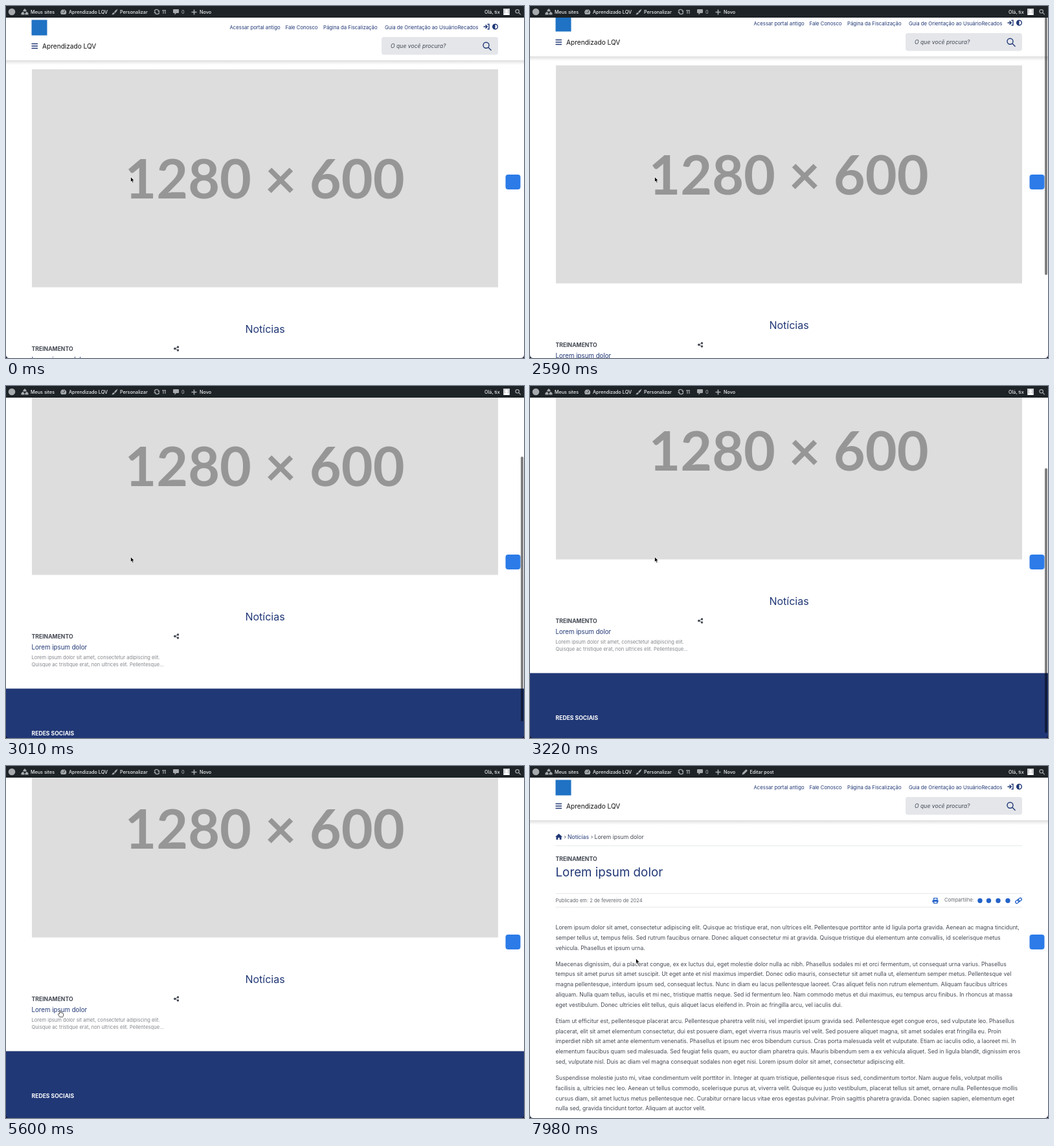
An HTML page for the animation above (8000 ms loop, 800 by 545 pixels).

```html
<!DOCTYPE html>
<html lang="pt-BR">
<head>
<meta charset="utf-8">
<style>
html, body { margin: 0; width: 100%; height: 100%; overflow: hidden; background: #fff }
svg { display: block; font: 8.64px Inter, sans-serif; fill: #434852 }
text { white-space: pre }
.bar { font-size: 7.2px; font-weight: 500; fill: #f0f0f1 }
.icon { fill: #a7aaad }
.line { fill: none; stroke: #a7aaad; stroke-width: 1.2 }
.navy { fill: #213876 }
.navyLine { fill: none; stroke: #213876; stroke-width: 1.4 }
.nav { font-size: 7.75px }
.site { font-size: 10.1px; fill: #111 }
.bold { font-weight: 700 }
.heading { font-size: 16px; text-anchor: middle }
.title { font-size: 18.8px }
.link { font-size: 9.72px }
.small { font-size: 7.6px; fill: #85888d }
.meta { font-size: 7.55px; fill: #63676d }
.rule { stroke: #e6e8ea }
.blue { fill: #2563c9 }
</style>
</head>
<body>
<svg id="stage" width="800" height="545" viewBox="0 0 800 545"></svg>
<script>
const text = (x, y, words, cls = '') => `<text x="${x}" y="${y}" class="${cls}">${words}</text>`;
const rect = (x, y, w, h, fill, r = 0) =>
  `<rect x="${x}" y="${y}" width="${w}" height="${h}" rx="${r}" fill="${fill}"/>`;
const path = (d, cls, extra = '') => `<path d="${d}" class="${cls}" ${extra}/>`;
const dot = (x, y, r, cls) => `<circle cx="${x}" cy="${y}" r="${r}" class="${cls}"/>`;

const siteName = 'Aprendizado LQV';

const adminBar = rect(0, 0, 800, 18, '#1d2327') +
  dot(9, 9, 5.3, 'icon') +
  path('M26.5 8.5V6.5L29 4l2.5 2.5v2zM23.5 13.5v-2.5l2.5-2.2 2.5 2.2v2.5zM29.5 13.5v-2.5l2.5-2.2 2.5 2.2v2.5z', 'icon') +
  text(38, 12, 'Meus sites') +
  path('M85.5 13A4.6 4.6 0 1 1 92 13z', 'icon') +
  path('M88.7 11l2.2-4M86 9.5h1M88.7 5.5v1', '', 'stroke="#1d2327" stroke-width=".9"') +
  text(97, 12, siteName) +
  path('M172.5 4.5q-4 2-5.5 5l1.5 1.5q3-2 4-6.5zM166.5 10q-2 0-3 3.5 3.5 0 4.5-2z', 'icon') +
  text(176, 12, 'Personalizar') +
  path('M229.2 8a3.6 3.6 0 0 1 6.8-.5M236.8 10a3.6 3.6 0 0 1-6.8.5', 'line') +
  path('M234 7.5h4l-2 2.5zM228 10.5h4l-2-2.5z', 'icon') +
  text(241, 12, '11') +
  path('M259 5h7q1 0 1 1v4q0 1-1 1h-3l-2.5 2.7V11H259q-1 0-1-1V6q0-1 1-1z', 'icon') +
  text(271, 12, '0', 'icon') +
  path('M290.5 5.5v8M286.5 9.5h8', 'line', 'style="stroke-width:1.6"') +
  text(299, 12, 'Novo') +
  `<g id="edit">${path('M327.5 13.5l.8-3 5.5-5.5 2.2 2.2-5.5 5.5z', 'icon')}${text(339.5, 12, 'Editar post')}</g>` +
  text(739, 12, 'Olá, tix') +
  rect(768, 4, 10, 10, '#cfd1d4') +
  path('M769 14q0-3.5 4-3.5t4 3.5zM773 5.5a2.2 2.4 0 1 1-.01 0z', '', 'fill="#fff"') +
  dot(789.7, 8.3, 2.7, 'line') + path('M791.8 10.3l3 3', 'line');

const header = rect(0, 84, 800, 7, 'url(#shade)') + rect(0, 18, 800, 66, '#fff') +
  rect(39.5, 21.5, 24, 24, '#1f72c4') +
  [[345.5, 'Acessar portal antigo'], [431.5, 'Fale Conosco'], [490, 'Página da Fiscalização'],
   [585, 'Guia de Orientação ao Usuário'], [697.5, 'Recados']]
    .map(([x, label]) => text(x, 35.6, label, 'navy nav')).join('') +
  path('M737.5 32h5M740.5 29.3l2.8 2.7-2.8 2.7M743.5 28.2h2.5v7.6h-2.5', 'navyLine') +
  dot(755.5, 32, 3.8, 'navyLine') + path('M755.5 28a4 4 0 0 0 0 8z', 'navy') +
  path('M39.5 58.5h9.5M39.5 62h9.5M39.5 65.5h9.5', 'navyLine') +
  text(56, 65.5, siteName, 'site') +
  rect(580, 48, 180, 27.5, '#e4e6ea', 4) +
  `<g font-style="italic">${text(594, 65, 'O que você procura?')}</g>` +
  `<g style="stroke-width:1.8">${dot(741.5, 60.8, 4.5, 'navyLine')}${path('M745 64.3l4.5 4.5', 'navyLine')}</g>`;

const home = header +
  rect(40, 98, 720, 337.5, '#ddd') +
  '<text x="399.5" y="297.5" fill="#969696" text-anchor="middle" style="font:700 84.3px Lato,sans-serif">1280 × 600</text>' +
  text(400, 506, 'Notícias', 'navy heading') +
  text(39.5, 533.5, 'TREINAMENTO', 'bold') +
  path('M265.5 528l-5 2.5 5 2.5', '', 'fill="none" stroke="#5c6066"') +
  dot(260.7, 530.5, 1.7) + dot(265.5, 528, 1.7) + dot(265.5, 533, 1.7) +
  text(39.5, 550.5, 'Lorem ipsum dolor', 'navy link') +
  text(39.5, 565.8, 'Lorem ipsum dolor sit amet, consectetur adipiscing elit.', 'small') +
  text(39.5, 577.2, 'Quisque ac tristique erat, non ultrices elit. Pellentesque…', 'small') +
  rect(0, 611.5, 800, 130, '#213876') +
  '<g fill="#fff">' + text(39.5, 684.2, 'REDES SOCIAIS', 'bold') + '</g>';

const paragraphs = [
`Lorem ipsum dolor sit amet, consectetur adipiscing elit. Quisque ac tristique erat, non ultrices elit. Pellentesque porttitor ante id ligula porta gravida. Aenean ac magna tincidunt,
semper tellus ut, tempus felis. Sed rutrum faucibus ornare. Donec aliquet consectetur mi at gravida. Quisque tristique dui elementum ante convallis, id scelerisque metus
vehicula. Phasellus et ipsum urna.`,
`Maecenas dignissim, dui a placerat congue, ex ex luctus dui, eget molestie dolor nulla ac nibh. Phasellus sodales mi et orci fermentum, ut consequat urna varius. Phasellus
tempus sit amet purus sit amet suscipit. Ut eget ante et nisl maximus imperdiet. Donec odio mauris, consectetur sit amet nulla ut, elementum semper metus. Pellentesque vel
magna pellentesque, interdum ipsum sed, consequat lectus. Nunc in diam eu lacus pellentesque laoreet. Cras aliquet felis non rutrum elementum. Aliquam faucibus ultrices
aliquam. Nulla quam tellus, iaculis et mi nec, tristique mattis neque. Sed id fermentum leo. Nam commodo metus et dui maximus, eu tempus arcu finibus. In rhoncus at massa
eget vestibulum. Donec ultricies elit tellus, quis aliquet lacus eleifend in. Proin ac fringilla arcu, vel iaculis dui.`,
`Etiam ut efficitur est, pellentesque placerat arcu. Pellentesque pharetra velit nisi, vel imperdiet ipsum gravida sed. Pellentesque eget congue eros, sed vulputate leo. Phasellus
placerat, elit sit amet elementum consectetur, dui est posuere diam, eget viverra risus mauris vel velit. Sed posuere aliquet magna, sit amet sodales erat fringilla eu. Proin
imperdiet nibh sit amet ante elementum venenatis. Phasellus et ipsum nec eros bibendum cursus. Cras porta malesuada velit et vulputate. Etiam ac iaculis odio, a laoreet mi. In
elementum faucibus quam sed malesuada. Sed feugiat felis quam, eu auctor diam pharetra quis. Mauris bibendum sem a ex vehicula aliquet. Sed in ligula blandit, dignissim eros
sed, vulputate nisl. Duis ac diam vel magna consequat sodales non eget nisi. Lorem ipsum dolor sit amet, consectetur adipiscing elit.`,
`Suspendisse molestie justo mi, vitae condimentum velit porttitor in. Integer at quam tristique, pellentesque risus sed, condimentum tortor. Nam augue felis, volutpat mollis
facilisis a, ultricies nec leo. Aenean ut tellus commodo, scelerisque purus at, viverra velit. Quisque eu justo vestibulum, placerat tellus sit amet, ornare nulla. Pellentesque mollis
cursus diam, sit amet luctus metus pellentesque nec. Curabitur ornare lacus vitae eros egestas pulvinar. Proin sagittis pharetra gravida. Donec sapien sapien, elementum eget
nulla sed, gravida tincidunt tortor. Aliquam at auctor velit.`];

let baseline = 253;
const article = paragraphs.map(p => {
  const lines = p.split('\n');
  const markup = lines.map((line, i) => text(39.5, baseline + i * 15.8, line)).join('');
  baseline += (lines.length - 1) * 15.8 + 25;
  return markup;
}).join('');

const post = rect(0, 0, 800, 545, '#fff') + header +
  path('M39 109.8l5.5-5 5.5 5h-1.5v4.2h-2.8v-3h-2.4v3h-2.8v-4.2z', 'navy') +
  text(52.5, 112.5, '›') + text(58, 112.5, 'Notícias', 'navy') + text(94, 112.5, '›') +
  text(99.5, 112.5, 'Lorem ipsum dolor') +
  path('M39.5 123.5H760M39.5 197.5H760M39.5 218.5H760', 'rule') +
  text(39.5, 147, 'TREINAMENTO', 'bold') +
  text(39.5, 171, 'Lorem ipsum dolor', 'navy title') +
  text(39.5, 211, 'Publicado em: 2 de fevereiro de 2024', 'meta') +
  path('M623 204h6.500v3.500H623zM621.500 207.500h9v3.500h-9zM623 210h6.500v3H623z', 'blue') +
  rect(624.2, 205.2, 4, 2, '#fff') + rect(624.2, 210.2, 4, 1.7, '#fff') +
  text(640, 210, 'Compartilhe:', 'meta') +
  [695, 708.5, 723, 738].map(x => dot(x, 208.5, 3.7, 'blue')).join('') +
  `<g transform="rotate(-38 754.5 208.5)" fill="none" stroke="#2563c9" stroke-width="1.3">
    <rect x="749" y="206.5" width="6.5" height="4" rx="2"/><rect x="753.5" y="206.5" width="6.5" height="4" rx="2"/></g>` +
  article;

document.getElementById('stage').innerHTML = `
<linearGradient id="shade" x2="0" y2="1"><stop stop-color="#dedede"/><stop offset="1" stop-color="#fff"/></linearGradient>
<rect width="800" height="545" fill="#fff"/>
<g id="home">${home}</g>
<g id="post">${post}</g>
${rect(771.5, 261, 23, 23, '#2c7be8', 4)}
<rect id="thumb" x="795" width="4" height="410" rx="2" fill="#000" fill-opacity=".5"/>
<g class="bar">${adminBar}</g>
<g id="status">${rect(-3, 533.5, 191, 15, '#dfe7f6', 3)}<text x="2" y="541.8" style="font-size:7px">https://qzlw.zz/aprendizadolqv/noticias/lorem-ipsum-dolor/</text></g>
<path d="M0 540v5h5q-5 0-5-5zM800 540v5h-5q5 0 5-5z" fill="#17142b"/>
<g id="cursor" stroke-width=".7" stroke-linejoin="round">
  <path id="arrow" d="M0 0v8l1.800-1.600 1.300 3 1.500-.7-1.300-2.800h2.400z" fill="#000" stroke="#fff"/>
  <path id="hand" d="M-.8 5.500V.8q.9-1.300 1.800 0v2.700q2-.6 2.300.5 1.700-.2 1.700 1v2.500q0 1.300-1 2.700H-.5L-3 6.300q-.2-1.500 1.200-1.200z" fill="#fff" stroke="#111"/>
</g>`;

const part = id => document.getElementById(id);
const show = (id, on) => part(id).style.display = on ? '' : 'none';

// Linear interpolation over keys of the form [time, ...values]
function track(keys, t) {
  const next = keys.findIndex(k => k[0] > t);
  if (next < 0) return keys.at(-1).slice(1);
  if (next === 0) return keys[0].slice(1);
  const a = keys[next - 1], b = keys[next], u = (t - a[0]) / (b[0] - a[0]);
  return a.slice(1).map((v, i) => v + (b[i + 1] - v) * u);
}

const scrollKeys = [[2450, 0], [2520, 1], [2590, 6], [2660, 21], [2730, 48], [2800, 79], [2870, 106],
  [2940, 127], [3010, 143], [3080, 154], [3150, 162], [3220, 167], [3360, 170]];
const cursorKeys = [[5040, 192.5, 264.5], [5180, 172, 295], [5390, 103, 368], [5600, 83.5, 378.5],
  [5740, 78, 379.5], [5950, 76, 379.5], [7420, 76, 379.5], [7630, 110, 345], [7910, 163.5, 298]];
const loaded = 7490;

function draw() {
  const t = Math.floor(performance.now() % 8000 / 70) * 70;
  const [scroll] = track(scrollKeys, t);
  const onPost = t >= loaded, pointing = t >= 5460 && t < 6440;
  part('home').setAttribute('transform', `translate(0 ${-scroll})`);
  part('thumb').setAttribute('y', 2 + scroll * .75);
  part('thumb').setAttribute('opacity', track([[2450, 0], [2520, 1], [3850, 1], [4060, 0]], t)[0]);
  part('cursor').setAttribute('transform', `translate(${track(cursorKeys, t)})`);
  show('post', onPost);
  show('edit', onPost);
  show('status', t >= 5740 && !onPost);
  show('hand', pointing);
  show('arrow', !pointing);
  requestAnimationFrame(draw);
}
draw();
</script>
</body>
</html>
```
